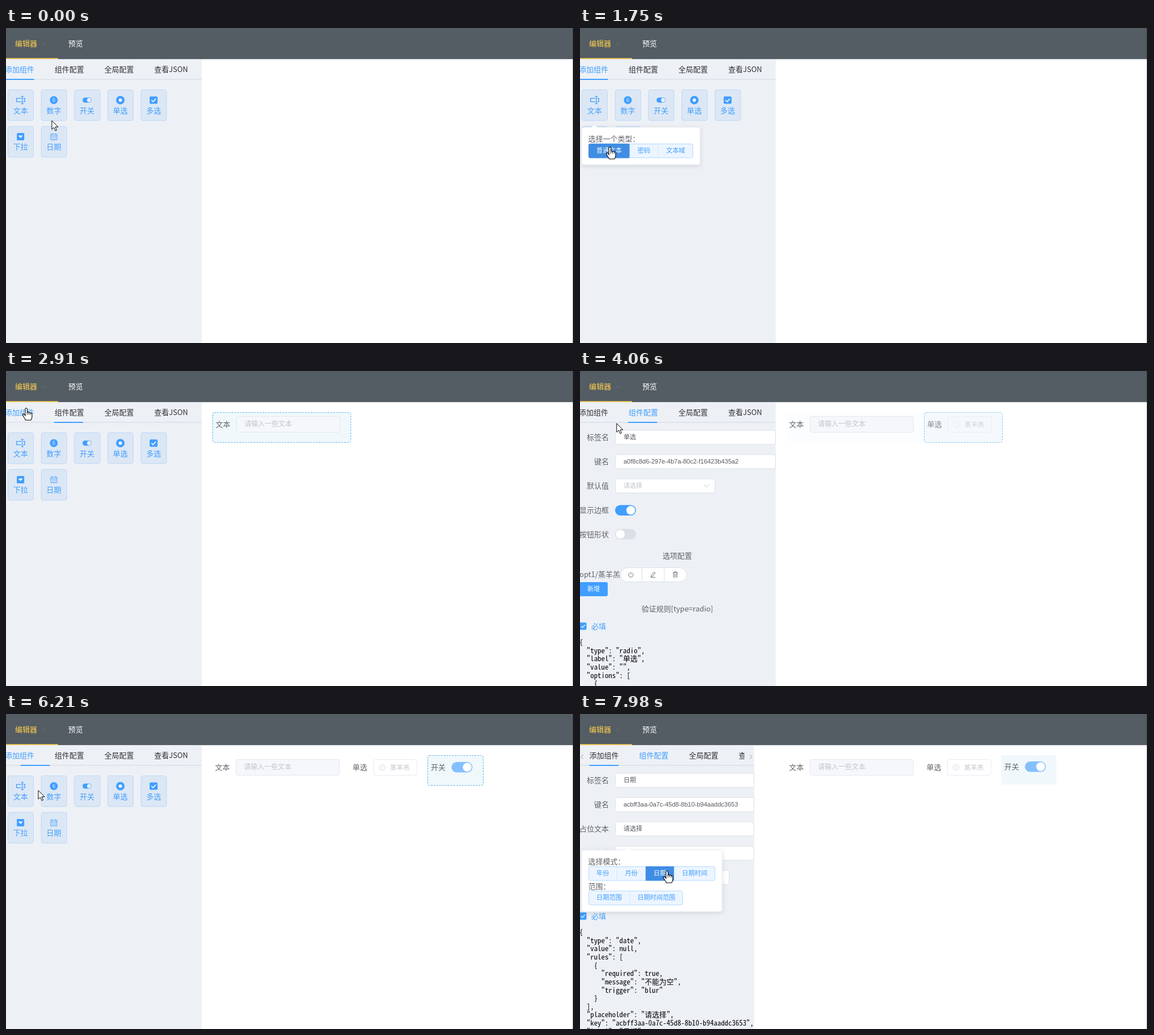
An HTML page that plays this animation: 1004x558 px, repeating every 8000 ms.

```html
<!DOCTYPE html>
<html lang="zh-CN">
<head>
<meta charset="utf-8">
<title>表单编辑器</title>
<style>
html, body { margin: 0; width: 100%; height: 100%; overflow: hidden; background: #fff; }
svg { display: block; width: 1004px; height: 558px; }
text { font-family: 'Noto Sans CJK SC', 'Noto Sans CJK', 'Open Sans', sans-serif; white-space: pre; }
.key { font-family: 'Liberation Sans', 'Noto Sans CJK SC', sans-serif; }
.code { font-family: 'Noto Sans Mono CJK SC', 'Noto Sans Mono CJK JP', monospace; }
</style>
</head>
<body>
<svg id="stage" viewBox="0 0 1004 558"></svg>
<script>
const LOOP = 8000;
const BLUE = '#409eff', DARK = '#303133', GREY = '#606266', PALE = '#c0c4cc', LINE = '#dcdfe6';

// Drawing helpers: each returns SVG markup
const text = (x, cy, s, fill = GREY, size = 13, more = '') =>
  `<text x="${x}" y="${cy + size * 0.36}" font-size="${size}" fill="${fill}" ${more}>${s}</text>`;
const rect = (x, y, w, h, fill, r = 0, more = '') =>
  `<rect x="${x}" y="${y}" width="${w}" height="${h}" rx="${r}" fill="${fill}" ${more}/>`;
const box = (x, y, w, h, fill, stroke, r = 3.5, more = '') =>
  rect(x + 0.5, y + 0.5, w - 1, h - 1, fill, r, `stroke="${stroke}" ${more}`);
const path = (d, stroke = BLUE, fill = 'none', more = '') =>
  `<path d="${d}" stroke="${stroke}" fill="${fill}" ${more}/>`;
const circle = (x, y, r, fill, more = '') => `<circle cx="${x}" cy="${y}" r="${r}" fill="${fill}" ${more}/>`;
const group = (id, body, more = '') => `<g id="${id}" ${more}>${body}</g>`;
const at = (x, y, body) => `<g transform="translate(${x} ${y})">${body}</g>`;
const middle = 'text-anchor="middle"';

const icons = [
  path('M1.5 -3H-7V3H1.5M5 -3H7.5V3H5M3.2 -6V6M1 -6.5H5.4M1 6.5H5.4', BLUE, 'none', 'stroke-width="1.3"'),
  circle(0, 0, 7, BLUE) + text(0, 0, '6', '#e3edf9', 9, middle),
  rect(-8, -4.5, 16, 9, BLUE, 4.5) + circle(3.6, 0, 3.7, '#e6eef9'),
  circle(0, 0, 7.5, BLUE) + circle(0, 0, 3, '#eef5fd'),
  rect(-7, -6.5, 14, 13, BLUE, 2) + path('M-3.8 0L-1 2.8L4 -2.5', '#fff', 'none', 'stroke-width="1.6"'),
  rect(-6.5, -6.5, 13, 13, BLUE, 1.5) + path('M-4 -2H4L0 2.5Z', 'none', '#fff'),
  path('M-5.5 -4.5H5.5V5.5H-5.5ZM-5.5 -1.5H5.5M-3 -6V-3.5M3 -6V-3.5', BLUE, 'none', 'stroke-width=".9"') +
    path('M-3.5 1H3.8M-3.5 3.5H3.8', BLUE, 'none', 'stroke-width="1.2" stroke-dasharray="1.5 1.4"')
];
const cardNames = ['文本', '数字', '开关', '单选', '多选', '下拉', '日期'];
const cards = cardNames.map((name, i) => at(3 + (i % 5) * 58.8, i < 5 ? 109 : 173.8,
  box(0, 0, 46, 55.5, '#dce7f5', '#bbd7f6') + at(22.7, 18.7, icons[i]) +
  text(22.7, 37, name, BLUE, 13, middle))).join('');

// Form rows
const rowY = i => 117.5 + i * 43;
const label = (i, s) => text(51, rowY(i), s, GREY, 13, 'text-anchor="end"');
const field = (i, name, value, right = 346, tone = '#55585e') => label(i, name) +
  box(62, rowY(i) - 13, right - 62, 26, '#fff', LINE) + text(77, rowY(i), value, tone, 11, 'class="key"');
const toggle = (x, cy, on, id = '') =>
  rect(x, cy - 9.3, 37, 18.6, on ? BLUE : LINE, 9.3) + circle(x + (on ? 27.7 : 9.3), cy, 7.8, '#fff', id);
const tick = cy => rect(-1.5, cy - 6.5, 13, 13, BLUE, 2) +
  path(`M2 ${cy}l2.5 2.6l4.2 -5`, '#fff', 'none', 'stroke-width="1.2"') + text(20, cy, '必填', BLUE);
const code = (cy, lines) => lines.split('\n').map((line, i) =>
  text(-1, cy + i * 14.63, line, '#000', 12.83, 'class="code"')).join('');
const heading = (cy, s) => text(172, cy, s, GREY, 13, middle);

const rules = `"rules": [
    {
      "required": true,
      "message": "不能为空",
      "trigger": "blur"
    }
  ],`;

const textForm = field(0, '标签名', '文本') + field(1, '键名', 'b3c97d10-58ea-4f06-9d21-c07e46a18f52') +
  field(2, '占位文本', '请输入一些文本') + field(3, '默认值', '') +
  heading(289, '验证规则[type=text]') + tick(320) + code(349, `{
  "type": "text",
  "label": "文本",
  "value": "",
  ${rules}
  "placeholder": "请输入一些文本",
  "key": "b3c97d10-58ea-4f06-9d21-c07e46a18f52"
}`);

const radioForm = field(0, '标签名', '单选') + field(1, '键名', 'a0f8c8d6-297e-4b7a-80c2-f16423b435a2') +
  field(2, '默认值', '请选择', 239, PALE) + path('M219 201l4.7 4.7l4.7 -4.7', PALE) +
  label(3, '显示边框') + toggle(62, 246.7, true) + label(4, '按钮形状') + toggle(62, 289, false) +
  heading(327, '选项配置') + text(-1, 360, 'opt1/蒸羊羔') +
  box(71, 348, 118, 26, '#fff', LINE, 12.5) + path('M109.5 348V373M149 348V373', LINE) +
  path('M88 357.7a4 4 0 1 0 4 0M90 356v4M126 362l5 -6l2 1.7l-5 6l-2.5 .6zM125 365.5h8M164 357.5h9M167 357v-1.5h3v1.5M165.5 358v7h6v-7M167.5 360v3M169.5 360v3', GREY, 'none', 'stroke-width=".9"') +
  rect(-5, 374, 54, 25, BLUE, 3) + text(13, 386.5, '新增', '#fff', 11, 'font-weight="500"') +
  heading(421.5, '验证规则[type=radio]') + tick(452) + code(480.5, `{
  "type": "radio",
  "label": "单选",
  "value": "",
  "options": [
    {`);

const switchForm = field(0, '标签名', '开关') + field(1, '键名', 'd854d81e-f970-44be-b8b2-abb7aa01f837') +
  label(2, '默认值') + toggle(62, 203.7, true, 'id="knob"') +
  text(51, 245.5, '形状', GREY, 13, 'text-anchor="end"') +
  box(62, 233, 63, 26, '#fff', LINE) + text(77, 246, '复选框', GREY, 11) +
  rect(123.9, 233.2, 51.3, 25.7, BLUE, 3) + text(138, 246, '开关', '#fff', 11) + code(283.5, `{
  "type": "switch",
  "label": "开关",
  "appearance": "switch",
  "value": true,
  "key": "d854d81e-f970-44be-b8b2-abb7aa01f837"
}`);

const dateForm = field(0, '标签名', '日期', 308) + field(1, '键名', 'acbff3aa-0a7c-45d8-8b10-b94aaddc3653', 308) +
  field(2, '占位文本', '请选择', 308) + field(3, '格式', '', 308) + field(4, '默认值', '', 264) +
  tick(358) + code(386.5, `{
  "type": "date",
  "value": null,
  ${rules}
  "placeholder": "请选择",
  "key": "acbff3aa-0a7c-45d8-8b10-b94aaddc3653",
  "label": "日期",`);

// Popovers with joined buttons that darken under the pointer
const BUTTON_H = 25.6;
const hotButtons = [];
function buttons(owner, y, edges, names) {
  const last = edges[edges.length - 1];
  return box(15, y, last - 15, BUTTON_H, '#ecf5ff', '#b3d8ff', 3) + names.map((name, i) => {
    const x = edges[i], w = edges[i + 1] - x, id = `${owner}-${hotButtons.length}`;
    hotButtons.push({ id, owner, x, y, w });
    return (i ? path(`M${x} ${y + 1}v24`, '#d3e8ff') : '') +
      group(id, rect(x, y, w, BUTTON_H, '#3f8de4', i ? 0 : 3), 'visibility="hidden"') +
      text(x + w / 2, y + 12.4, name, BLUE, 11.2, `${middle} id="${id}-label"`);
  }).join('');
}
const popover = (id, y, w, h, arrow, body) => group(id,
  rect(3, y, w, h, '#fff', 4, 'stroke="#ebeef5" filter="url(#shadow)"') +
  path(`M${arrow - 6} ${y + 1}l6 -5.5l6 5.5z`, 'none', '#fff') + body);

// Canvas components
const part = (id, x, w, body) => group(id,
  group(id + '-fill', rect(x, 73, w - 2, 52, '#f0f8fb', 2)) +
  group(id + '-edge', rect(x + .5, 73.5, w - 1, 53, '#f0f8fb', 3, 'stroke="#5cb3f0" stroke-dasharray="3 2"')) +
  group(id + '-body', body));
const parts = [
  { id: 'partText', from: 1830, until: 3690 },
  { id: 'partRadio', from: 3750, until: 5280 },
  { id: 'partSwitch', from: 5360, until: 7910 }
];

const tabNames = ['添加组件', '组件配置', '全局配置', '查看JSON'];
const tabX = [-2, 86, 174, 262];
const chevrons = path('M5.5 72l-3.5 3.7l3.5 3.7M300.5 72l3.5 3.7l-3.5 3.7', '#909399');

document.getElementById('stage').innerHTML = `
  <defs>
    <filter id="shadow" x="-10%" y="-20%" width="120%" height="150%">
      <feDropShadow dx="0" dy="2" stdDeviation="4" flood-color="#000" flood-opacity=".12"/>
    </filter>
    <clipPath id="tabClip"><rect id="tabWindow" y="55" height="40"/></clipPath>
  </defs>` +
  rect(0, 0, 1004, 558, '#fff') +
  rect(0, 55, 346, 503, '#edf1f6', 0, 'id="panel"') +
  rect(0, 90, 346, 2, '#dfe4ec', 0, 'id="tabLine"') +
  `<g clip-path="url(#tabClip)">${group('tabs',
    tabNames.map((s, i) => text(tabX[i], 73.5, s, DARK, 13, `id="tab${i}"`)).join('') +
    rect(-2, 90, 51.5, 2, BLUE, 0, 'id="bar"'))}</g>` +
  group('chevrons', chevrons) +
  group('add', cards) + group('text', textForm) + group('radio', radioForm) +
  group('switch', switchForm) + group('date', dateForm) +
  part('partText', 365, 245, text(370.5, 94, '文本') + box(407, 80, 184, 29, '#f5f7fa', '#e4e7ed') +
    text(421.5, 94, '请输入一些文本', PALE, 12)) +
  part('partRadio', 608, 139, text(613.5, 94, '单选') + box(650, 80, 78, 29, 'none', '#e8ecf3') +
    circle(666, 94.5, 5.3, '#f5f7fa', 'stroke="#e0e4eb"') + text(680, 95, '蒸羊羔', PALE, 11.5, 'font-weight="500"')) +
  part('partSwitch', 745, 99, text(751, 94, '开关') + rect(787.5, 85, 37, 18.6, '#85c0fd', 9.3) +
    circle(815.2, 94.3, 7.8, '#fff')) +
  popover('popText', 176, 209, 66, 25.5, text(14.5, 196.5, '选择一个类型：') +
    buttons('popText', 204.8, [15, 88, 138, 200], ['普通文本', '密码', '文本域'])) +
  popover('popDate', 241, 248, 109, 84, text(14.5, 261.5, '选择模式：') +
    buttons('popDate', 269.8, [15, 65.5, 116, 166.5, 239], ['年份', '月份', '日期', '日期时间']) +
    text(14.5, 305, '范围：') + buttons('popDate', 313, [15, 88, 182], ['日期范围', '日期时间范围'])) +
  rect(0, 0, 1004, 55, '#545c64') + rect(0, 55, 1004, 1, '#e2e4e7') + rect(0, 53.4, 92, 1.6, '#ffd04b') +
  text(16, 27.5, '编辑器', '#ffd04b') + path('M64 26l4 3.5l4 -3.5', '#69717a') + text(110, 27.5, '预览', '#fff') +
  rect(1002, 0, 2, 558, '#1c1c1e') +
  group('arrow', path('M0 0V15.5L3.6 12.2L6.2 18L8.6 17L6.1 11.3H11Z', '#000', '#fff')) +
  group('hand', path('M-2 12V1.5a1.8 1.8 0 0 1 3.6 0V7.5a1.7 1.7 0 0 1 3 .5a1.7 1.7 0 0 1 3 .8a1.5 1.5 0 0 1 2.4 1V15q0 3 -2 6H-1.5q-.5 -2 -2.5 -4.5l-2.3 -4.2q-.6 -2 1.2 -2.2q1.4 .2 3.1 2.9z', '#000', '#fff', 'stroke-width="1.1"') +
    path('M1.6 7.5v4M4.6 8v3.5M7.6 9v2.5', '#000', 'none', 'stroke-width=".9"'));

const $ = id => document.getElementById(id);
const set = (id, name, value) => $(id).setAttribute(name, value);
const show = (id, on) => set(id, 'display', on ? 'inline' : 'none');
const clamp = v => Math.min(1, Math.max(0, v));
const ramp = (t, start, length) => clamp((t - start) / length);
const easeInOut = p => p < .5 ? 4 * p ** 3 : 1 - 4 * (1 - p) ** 3;

const pages = [[0, 'add'], [1760, 'text'], [2890, 'add'], [3690, 'radio'], [4520, 'add'],
  [5280, 'switch'], [6040, 'add'], [7910, 'date']];

// Pointer stops: time, x, y, hand shape from here on
const stops = [
  [0, 81, 164, 0], [70, 81, 164, 0], [380, 46, 135, 1], [700, 26, 147, 1], [930, 26, 147, 1],
  [1120, 31, 168, 0], [1400, 43, 204, 1], [1680, 53, 211, 1], [1950, 53, 211, 0], [2600, 40, 92, 0],
  [2800, 36, 66, 1], [2940, 36, 66, 1], [3020, 50, 92, 0], [3200, 122, 118, 1], [3450, 199, 132, 1],
  [3760, 199, 132, 0], [4060, 65, 93, 0], [4200, 40, 72, 1], [4560, 36, 70, 1], [4640, 50, 92, 0],
  [4850, 120, 132, 1], [5060, 149, 148, 1], [5400, 149, 148, 0], [5900, 44, 80, 1], [6000, 36, 74, 1],
  [6080, 36, 74, 0], [6210, 57, 135, 0], [6340, 70, 176, 1], [6520, 84, 205, 1], [6960, 84, 205, 1],
  [7100, 100, 231, 0], [7400, 135, 269, 1], [7750, 154, 278, 1], [LOOP, 154, 278, 1]
];

function pointer(t) {
  const i = stops.findIndex(s => s[0] > t);
  const a = stops[i - 1], b = stops[i], p = (t - a[0]) / (b[0] - a[0]);
  return { x: a[1] + (b[1] - a[1]) * p, y: a[2] + (b[2] - a[2]) * p, hand: a[3] };
}

function draw(t) {
  const index = pages.filter(p => p[0] <= t).length - 1;
  const [since, page] = pages[index];
  const narrow = page === 'date', width = narrow ? 308 : 346;

  for (const id of ['add', 'text', 'radio', 'switch', 'date']) show(id, id === page);
  set('panel', 'width', width);
  set('tabLine', 'width', width);
  set('tabs', 'transform', `translate(${narrow ? 18.5 : 0} 0)`);
  set('tabWindow', 'x', narrow ? 15 : 0);
  set('tabWindow', 'width', narrow ? 275.5 : 346);
  show('chevrons', narrow);
  const active = page === 'add' ? 0 : 1;
  tabNames.forEach((_, i) => set('tab' + i, 'fill', i === active ? BLUE : DARK));
  const slide = index ? easeInOut(ramp(t, since, 300)) : 1;
  set('bar', 'x', -2 + 87 * (narrow ? 0 : active ? slide : 1 - slide));
  set('knob', 'cx', 53 + 36.7 * easeInOut(ramp(t, 5290, 300)));

  for (const { id, from, until } of parts) {
    const selected = t < until, shown = ramp(t, from, 500);
    // Losing the border moves the content; the row settles once the next part arrives
    const settled = selected || t > until + 75;
    show(id, t >= from);
    show(id + '-edge', selected);
    set(id + '-edge', 'opacity', .3 + .7 * shown);
    set(id + '-fill', 'opacity', selected ? 0 : 1 - ramp(t, until + 75, 400));
    set(id + '-body', 'opacity', .3 + .7 * shown);
    set(id + '-body', 'transform', `translate(${selected ? 0 : -1} ${settled ? 0 : -1})`);
  }

  set('popText', 'opacity', ramp(t, 560, 200) * (1 - ramp(t, 1790, 250)));
  set('popDate', 'opacity', ramp(t, 6920, 200));

  const { x, y, hand } = pointer(t);
  for (const b of hotButtons) {
    const open = b.owner === 'popText' ? t > 560 && t < 2040 : t > 6920;
    const hot = open && x >= b.x && x < b.x + b.w && y >= b.y && y < b.y + BUTTON_H;
    set(b.id, 'visibility', hot ? 'visible' : 'hidden');
    set(b.id + '-label', 'fill', hot ? '#fff' : BLUE);
  }
  show('hand', hand);
  show('arrow', !hand);
  set(hand ? 'hand' : 'arrow', 'transform', `translate(${x} ${y})`);
}

const start = performance.now();
function animate(now) {
  draw(Math.max(0, now - start) % LOOP);
  requestAnimationFrame(animate);
}
draw(0);
requestAnimationFrame(animate);
</script>
</body>
</html>
```
